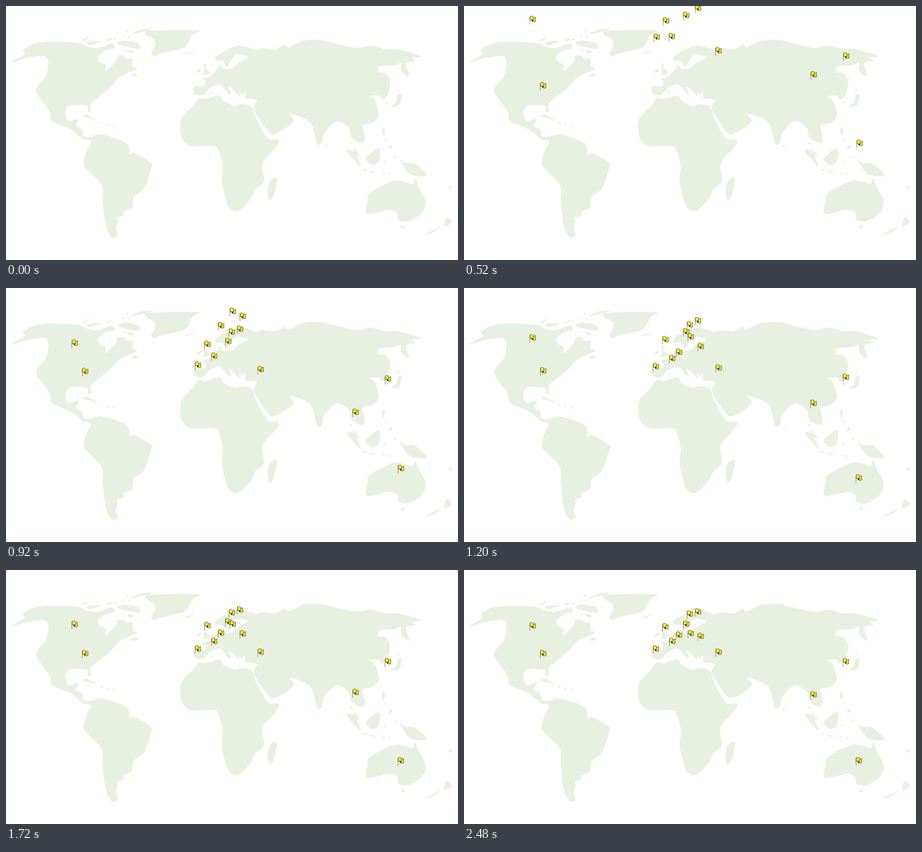
Recreate the animation shown at these times as an HTML page. Size 998 by 561 pixels, loop 7.88 s.

```html
<!DOCTYPE html>
<html>
<head>
<meta charset="utf-8">
<style>
html, body { margin: 0; width: 100%; height: 100%; overflow: hidden; background: #fff; }
svg { display: block; width: 100vw; height: 100vh; }
</style>
</head>
<body>
<svg viewBox="0 0 998 561">
  <defs>
    <g id="flag" stroke="#38361c" stroke-width=".8" stroke-linejoin="round">
      <path d="M.5-6V11" stroke="#555"/>
      <path d="M6-4Q10-2 13-5V5Q10 7 6 5Z" fill="#e9dd2d"/>
      <path d="M1-6Q3-8 6-7L8-6V2Q4 0 1 2Z" fill="#f8ed2c"/>
      <path d="M4 2Q6 1 8 2L6 5Z" fill="#111"/>
    </g>
  </defs>
  <g id="land" fill="#e8f1e1" stroke="#e8f1e1" stroke-linejoin="round">
    <!-- Americas -->
    <polygon points="13,124 41,107 38,99 43,93 64,83 102,79 160,82 178,90 203,93 234,83 239,93 221,97 203,112 207,124 219,130 220,144 243,122 246,111 259,110 266,117 279,117 279,134 288,139 252,156 227,182 188,214 188,231 181,233 179,220 141,219 130,236 139,255 160,249 154,265 168,273 171,288 188,291 172,295 145,273 102,254 97,233 69,194 70,177 89,155 94,122 83,110 45,115"/>
    <polygon points="172,292 190,289 206,284 235,290 268,305 273,329 283,325 319,346 320,357 305,402 282,421 278,444 260,453 259,462 245,467 246,476 242,492 246,506 234,511 221,486 214,432 212,395 177,358 172,347 178,321 188,300"/>
    <polygon points="308,62 320,55 423,54 411,64 394,91 343,104 328,111 321,104 329,90 328,75"/>
    <polygon points="246,83 260,77 290,82 295,94 272,91"/>
    <polygon points="275,62 300,52 322,51 300,57"/>
    <polygon points="180,80 210,78 186,86"/>
    <polygon points="168,76 183,69 173,77"/>
    <polygon points="222,75 235,72 226,77"/>
    <polygon points="268,98 283,101 274,104"/>
    <polygon points="277,155 284,149 291,154"/>
    <polygon points="170,244 180,241 200,253 186,248"/>
    <!-- Africa -->
    <polygon points="426,204 440,206 471,198 480,210 504,221 520,217 543,223 552,248 578,293 602,296 596,312 566,347 569,387 550,405 541,424 520,447 503,453 489,438 477,390 479,352 469,317 458,309 408,309 388,290 387,250 412,222"/>
    <polygon points="584,386 598,381 591,418 582,428 578,408"/>
    <!-- Europe -->
    <polygon points="416,193 417,178 438,177 441,167 434,160 450,157 469,137 472,130 480,139 500,138 512,127 535,113 510,107 499,117 488,133 478,121 463,120 465,111 490,96 515,88 550,97 543,105 570,99 570,200 540,204 529,203 528,188 521,194 514,187 515,198 500,183 490,177 496,192 490,192 473,173 450,181 435,196"/>
    <polygon points="436,130 441,128 440,136 450,148 435,152 438,146"/>
    <polygon points="420,146 430,138 428,145"/>
    <polygon points="396,104 415,99 398,105"/>
    <!-- Asia -->
    <polygon points="556,101 594,96 616,86 624,92 657,77 698,76 730,84 775,93 805,88 836,96 865,96 915,111 895,114 903,121 883,127 890,155 873,143 872,125 858,130 826,133 820,146 837,149 847,167 831,195 700,200 556,195"/>
    <polygon points="560,185 700,170 836,188 831,207 824,198 803,196 804,201 814,208 823,241 809,258 787,264 792,291 785,302 763,290 757,269 730,254 702,281 698,301 687,304 676,263 655,246 625,238 635,253 614,272 588,283 571,266 548,228 556,206"/>
    <polygon points="865,197 873,195 868,218 851,221 862,212"/>
    <polygon points="846,154 853,162"/>
    <polygon points="855,168 861,174"/>
    <polygon points="830,273 836,271 834,287"/>
    <polygon points="848,308 853,310 846,317"/>
    <polygon points="753,320 768,322 783,355 768,340"/>
    <polygon points="768,314 780,331 772,328"/>
    <polygon points="795,336 824,314 822,344 806,350"/>
    <polygon points="788,361 797,361 792,363"/>
    <polygon points="802,363 815,368 808,367"/>
    <!-- Oceania -->
    <polygon points="870,340 880,347 903,349 928,374 892,371"/>
    <polygon points="802,415 833,396 860,386 885,390 898,394 904,381 909,396 926,431 917,458 888,475 867,472 864,457 845,450 797,459 799,430"/>
    <polygon points="873,487 882,486 875,491"/>
    <polygon points="973,467 984,477 968,486"/>
    <polygon points="926,505 958,488 943,499"/>
    <polygon points="978,397 985,401 981,403"/>
  </g>
  <g id="flags"></g>
</svg>
<script>
const LOOP = 7880, END = 2480, STEP = 40;
const land = document.getElementById("land");
const make = (parent, tag, attrs) => {
  const el = document.createElementNS("http://www.w3.org/2000/svg", tag);
  for (const k in attrs) el.setAttribute(k, attrs[k]);
  return parent.appendChild(el);
};

// Closed smooth curve through the corners of a polygon
function smooth(pts) {
  const at = i => pts[(i + pts.length) % pts.length];
  const ctrl = (p, a, b) => [p.x + (b.x - a.x) / 7, p.y + (b.y - a.y) / 7];
  return "M" + [pts[0].x, pts[0].y] + pts.map((p, i) => {
    const q = at(i + 1);
    return "C" + [ctrl(p, at(i - 1), q), ctrl(q, at(i + 2), p), q.x, q.y];
  }).join("") + "Z";
}
for (const poly of land.querySelectorAll("polygon")) {
  make(land, "path", { d: smooth([...poly.points]) });
  poly.remove();
}

// Small islands
[[241,74], [259,67], [271,68], [268,57], [261,98], [211,258], [224,262], [238,264], [452,191],
 [866,186], [838,213], [838,296], [706,309], [762,303], [834,369], [846,371], [837,344], [859,334]]
  .forEach(([cx, cy]) => make(land, "circle", { cx, cy, r: 1.8 }));

// x, y, start, landing, first bounce length, bounce height, sideways drift, fall easing
const flags = [
  [145, 123, 360, 900, 640, .1],
  [168, 184, 120, 478, 442, .125, -2.5],
  [417, 174, 352, 746, 340, .022, 3.3],
  [438, 125, 343, 905, 640, .083, 2],
  [492, 97, 548, 920, 580, .15],
  [510, 92, 452, 927, 700, .21],
  [484, 119, 400, 909, 700, .18],
  [453, 157, 324, 748, 340, .042, -1.6],
  [468, 143.5, 566, 1150, 700, .05],
  [494, 140, 672, 1467, 640, .144, 0, 1.4],
  [516, 146, 617, 1273, 800, .034],
  [555.5, 181, 251, 912, 320, .07, -.7, 1.6],
  [836.5, 202, 251, 912, 320, .07, 1.6, 1.6],
  [765, 275, 251, 912, 680, .074, 1, 1.6],
  [865, 421, 96, 680, 320, .07, 6.4]
].map(f => ({ f, el: make(document.getElementById("flags"), "use", { href: "#flag" }) }));

// Remaining share of the drop: 1 at the top, 0 at rest
function drop(t, start, hit, len, high, ease) {
  if (t >= END) return 0;
  if (t < hit) return (1 - (t - start) / (hit - start)) ** ease;
  t -= hit;
  for (let i = 0; i < 3; i++, len /= 2, high /= 4) {
    if (t < len) return 4 * high * t / len * (1 - t / len);
    t -= len;
  }
  return 0;
}

const begin = performance.now();
function draw(now) {
  const t = Math.floor(Math.max(0, now - begin) % LOOP / STEP) * STEP;
  for (const { f: [x, y, start, hit, len, high, drift = 0, ease = 1], el } of flags) {
    const shown = t >= Math.max(120, start);
    el.setAttribute("visibility", shown ? "visible" : "hidden");
    if (!shown) continue;
    const rest = drop(t, start, hit, len, high, ease);
    el.setAttribute("transform", `translate(${x + drift * rest} ${y - (y + 10) * rest})`);
  }
  requestAnimationFrame(draw);
}
draw(begin);
</script>
</body>
</html>
```
